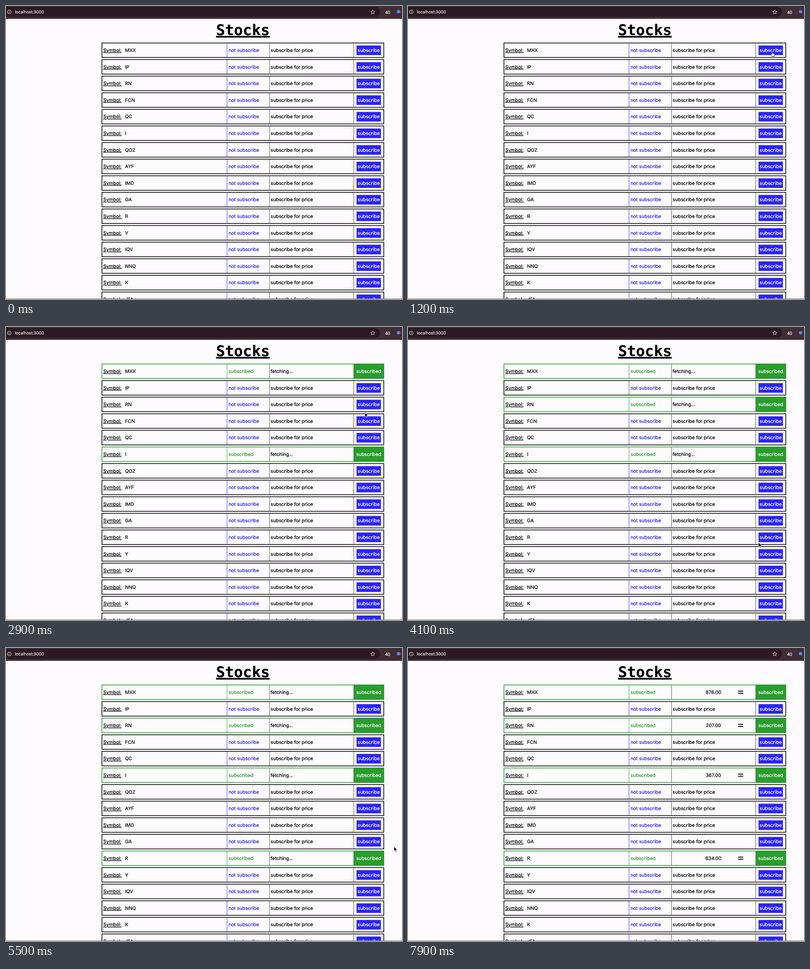
An HTML page that plays this animation: 800x593 px, repeating every 8000 ms.

```html
<!DOCTYPE html>
<html lang="en">
<head>
<meta charset="utf-8">
<title>Stocks</title>
<style>
  html, body { margin: 0; width: 100%; height: 100%; overflow: hidden; background: #fdfbfe; }
  svg { display: block; width: 800px; height: 593px; font: 9.6px Inter, sans-serif; }
  text { stroke-width: 0.22px; text-rendering: geometricPrecision; }
  .title { font: bold 30px "DejaVu Sans Mono", monospace; }
  .line { text-decoration: underline; }
  .mid { text-anchor: middle; }
</style>
</head>
<body>
<svg id="stage" viewBox="0 0 800 593"></svg>
<script>
const LOOP = 8000, STEP = 100;
const ROW_TOP = 74, ROW_PITCH = 33.6;
const BLUE = '#2b24f4', GREEN = '#2a9d2e', INK = '#000';
const PRICES_AT = 6800;

const symbols = 'MXX IP RN FCN QC I QOZ AYF IMD GA R Y IQV NNQ K JFA'.split(' ');
const subscriptions = {
  MXX: { at: 1400, price: '876.00' },
  I: { at: 2200, price: '367.00' },
  RN: { at: 3400, price: '207.00' },
  R: { at: 4600, price: '634.00' }
};

// Pointer tip: time, x, y
const path = [
  [500, 806, 150], [900, 752, 106], [1200, 735.5, 92], [1400, 735.5, 92],
  [1900, 721, 251], [2200, 722, 254], [2900, 725, 173], [3100, 727, 154],
  [3400, 727, 154], [4100, 708, 436], [4400, 724, 422], [4700, 724, 422],
  [5500, 784, 402], [6000, 806, 394]
];

const stage = document.getElementById('stage');

function add(parent, tag, attrs, content) {
  const node = document.createElementNS('http://www.w3.org/2000/svg', tag);
  for (const key in attrs) node.setAttribute(key, attrs[key]);
  if (content) node.textContent = content;
  return parent.appendChild(node);
}
const rect = (parent, x, y, width, height, fill, more) =>
  add(parent, 'rect', { x, y, width, height, fill, ...more });
// The thin stroke gives the slightly heavy look of smoothed screen text.
const text = (parent, x, y, content, color = INK, cls = '') =>
  add(parent, 'text', { x, y, fill: color, stroke: color, class: cls }, content);
const show = (node, on) => node.setAttribute('visibility', on ? 'visible' : 'hidden');

function buildToolbar() {
  rect(stage, 0, 0, 800, 26, '#402d35');
  rect(stage, -20, 2, 776, 20, '#2b1a21', { rx: 10 });
  add(stage, 'circle', { cx: 6.5, cy: 12, r: 3.8, fill: 'none', stroke: '#e4dce0' });
  rect(stage, 6, 11.3, 1, 2.7, '#e4dce0');
  rect(stage, 6, 9.6, 1, 1, '#e4dce0');
  text(stage, 18, 15, 'localhost:3000', '#eee7ea').style.fontSize = '8.3px';
  const star = Array.from({ length: 10 }, (_, i) => {
    const a = i * Math.PI / 5, r = i % 2 ? 2 : 4.4;
    return [741 + r * Math.sin(a), 12.3 - r * Math.cos(a)];
  });
  add(stage, 'polygon', { points: star.join(' '), fill: 'none', stroke: '#e4dce0', 'stroke-width': 0.9 });
  text(stage, 771, 15.5, '40', '#f4eef0', 'mid').style.font = '10px "Liberation Serif", serif';
  add(stage, 'circle', { cx: 793, cy: 11.5, r: 3.6, fill: '#5b7fe0' });
}

function buildRow(symbol, index) {
  const row = add(stage, 'g', { transform: `translate(0 ${ROW_TOP + index * ROW_PITCH})` });
  const border = rect(row, 193.8, 0.8, 569.4, 29.4, 'none', { 'stroke-width': 1.4 });
  text(row, 196.6, 19, 'Symbol:', INK, 'line');
  text(row, 240.5, 19, symbol);
  const divider = rect(row, 446.1, 1.5, 0.8, 28, BLUE);
  rect(row, 532, 1.5, 0.8, 28, '#444');
  rect(row, 702, 1.5, 0.8, 28, '#444');
  const status = text(row, 449.4, 19, '');
  const note = text(row, 534.6, 19, '');
  const price = add(row, 'g', {});
  const button = rect(row, 0, 0, 0, 0, BLUE);
  const label = text(row, 732.7, 19, '', '#fff', 'mid');

  const sub = subscriptions[symbol];
  if (sub) {
    text(price, 617, 19, sub.price, INK, 'mid');
    rect(price, 667, 12.4, 10.2, 1.8, INK);
    rect(price, 667, 16.6, 10.2, 1.8, INK);
  }

  function update(time) {
    const on = !!sub && time >= sub.at, priced = on && time >= PRICES_AT;
    border.setAttribute('stroke', on ? GREEN : INK);
    divider.setAttribute('fill', on ? GREEN : BLUE);
    for (const paint of ['fill', 'stroke']) status.setAttribute(paint, on ? GREEN : '#2a22e0');
    status.textContent = on ? 'subscribed' : 'not subscribe';
    note.textContent = priced ? '' : on ? 'fetching...' : 'subscribe for price';
    show(price, priced);
    const [x, y, width, height] = on ? [702.6, 0, 61.4, 31] : [708.2, 6, 49.2, 19.4];
    const box = { x, y, width, height, fill: on ? GREEN : BLUE };
    for (const key in box) button.setAttribute(key, box[key]);
    label.textContent = on ? 'subscribed' : 'subscribe';
    return on;
  }
  return update;
}

function pointerAt(time) {
  const next = path.findIndex(point => point[0] > time);
  if (next < 1) return null;
  const [t0, x0, y0] = path[next - 1], [t1, x1, y1] = path[next];
  const k = (time - t0) / (t1 - t0), ease = k * k * (3 - 2 * k);
  return [x0 + (x1 - x0) * ease, y0 + (y1 - y0) * ease];
}

buildToolbar();
text(stage, 478.6, 58.8, 'Stocks', INK, 'title line mid');
const rows = symbols.map(buildRow);
rect(stage, 0, 592, 800, 1, '#888');

const arrow = add(stage, 'path', {
  d: 'M0 0V9L2 7.2L3.4 10.4L4.9 9.7L3.5 6.6H6.2Z',
  fill: INK, stroke: '#fff', 'stroke-width': 0.6
});
const hand = add(stage, 'path', {
  d: 'M-.9 .6Q0 -.6 .8 .6V3.8Q2 3 2.6 4Q3.8 3.5 4.2 4.6Q5.5 4.3 5.5 5.6V7.4L4.6 10H-.2L-2.8 6.6Q-3 5.3 -1.8 5.5L-.9 6.3Z',
  fill: '#fff', stroke: INK, 'stroke-width': 0.8
});

function drawPointer(time, active) {
  const tip = pointerAt(time);
  let overButton = false;
  if (tip) {
    const [x, y] = tip, index = Math.floor((y - ROW_TOP) / ROW_PITCH);
    const within = y - ROW_TOP - index * ROW_PITCH;
    overButton = x > 708.2 && x < 757.4 && within > 6 && within < 25.4 && !active[index];
    for (const node of [arrow, hand]) node.setAttribute('transform', `translate(${x} ${y})`);
  }
  show(hand, tip && overButton);
  show(arrow, tip && !overButton);
}

function render(now) {
  const time = Math.floor(now % LOOP / STEP) * STEP;
  drawPointer(time, rows.map(update => update(time)));
}

const start = performance.now();
function tick() {
  render(performance.now() - start);
  requestAnimationFrame(tick);
}
tick();
</script>
</body>
</html>
```
